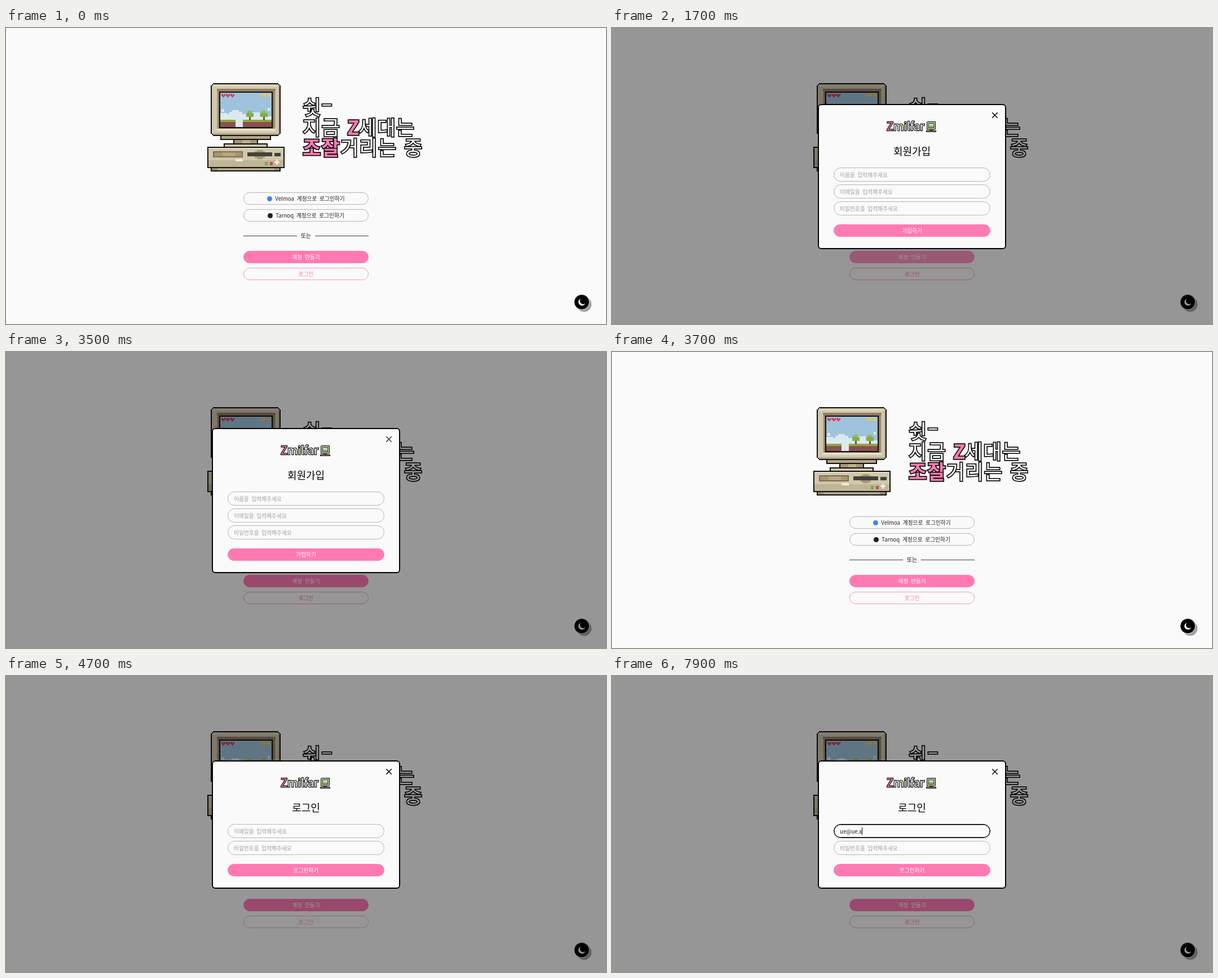
Write an HTML page that moves like this. It is 1064 px wide and 526 px high and loops after 8 s.

```html
<!DOCTYPE html>
<html lang="ko">
<head>
<meta charset="utf-8">
<title>로그인</title>
<style>
  :root { --pink: #ff7ab2; --paper: #fafafa; }
  * { box-sizing: border-box; }
  html, body { margin: 0; width: 100%; height: 100%; overflow: hidden; background: var(--paper); }
  body {
    position: relative;
    font: 300 9.7px "Noto Sans CJK KR", "Noto Sans CJK", "Noto Sans CJK JP", "Noto Sans", sans-serif;
    word-spacing: 2px;
    color: #222;
  }
  .art { position: absolute; left: 0; top: 0; }
  .art rect { shape-rendering: crispEdges; }
  .outlined { fill: #fff; stroke: #0c0c0c; paint-order: stroke; stroke-linejoin: miter; stroke-miterlimit: 2; }
  .outlined .hot { fill: var(--pink); }
  .headline { font-size: 35px; letter-spacing: 1.2px; stroke-width: 3.4px; }
  .headline .hot { font-weight: 700; }
  .pill {
    position: absolute; display: flex; align-items: center; justify-content: center; gap: 5px;
    height: 22px; border-radius: 13px; border: 1px solid #b4b4b4; white-space: pre;
  }
  .main { left: 421px; width: 222px; }
  .solid { background: var(--pink); border-color: var(--pink); color: #fff; font-weight: 400; }
  .line { color: var(--pink); border-color: #f59abf; }
  .hover { opacity: .8; }
  .dot { width: 9px; height: 9px; border-radius: 50%; }
  .or { position: absolute; left: 421px; top: 359px; width: 222px; line-height: 20px; text-align: center; color: #000; }
  .or::before, .or::after { content: ""; position: absolute; top: 10px; width: 95px; height: 1px; background: #3c3f3c; }
  .or::before { left: 0; }
  .or::after { right: 0; }
  .shade { position: absolute; inset: 0; background: rgba(0, 0, 0, .4); }
  .modal {
    position: absolute; left: 365px; width: 334px; border-radius: 6px;
    background: var(--paper); box-shadow: inset 0 0 0 2px #000;
  }
  .modal > * { position: absolute; }
  .modal .pill { left: 28px; width: 278px; }
  .close { left: 309px; top: 15px; }
  .logo { left: 115px; top: 28px; }
  .logo text { font-size: 20px; stroke-width: 2.4px; }
  .title { top: 73px; width: 100%; font-size: 18px; line-height: 20px; text-align: center; color: #000; }
  .modal .field { height: 25px; justify-content: flex-start; padding-left: 10px; gap: 0; color: #222; }
  .hint { color: #a2a2a2; }
  .caret { position: absolute; width: 1px; height: 13px; top: 5px; background: #000; }
  .focus { border-color: #000; box-shadow: inset 0 0 0 .7px #000; }
  [hidden] { display: none !important; }
</style>
</head>
<body>
<svg class="art" width="1064" height="526" viewBox="0 0 1064 526">
  <!-- stand -->
  <rect x="380" y="190" width="90" height="9" fill="#111"/>
  <rect x="382" y="192" width="86" height="5" fill="#b3a586"/>
  <rect x="403" y="197" width="44" height="10" fill="#111"/>
  <rect x="405" y="199" width="40" height="6" fill="#a59677"/>
  <rect x="419" y="199" width="14" height="6" fill="#bdb092"/>
  <rect x="386" y="205" width="78" height="8" fill="#111"/>
  <rect x="388" y="207" width="74" height="4" fill="#cfc6aa"/>
  <!-- monitor -->
  <rect x="367" y="98" width="116" height="94" fill="#111"/>
  <rect x="365" y="100" width="120" height="90" fill="#111"/>
  <rect x="363" y="102" width="124" height="86" fill="#111"/>
  <rect x="367" y="100" width="116" height="90" fill="#d0c8ae"/>
  <rect x="365" y="102" width="120" height="86" fill="#d0c8ae"/>
  <rect x="367" y="102" width="114" height="2" fill="#e2dbc5"/>
  <rect x="367" y="187" width="116" height="3" fill="#b0a483"/>
  <rect x="483" y="104" width="2" height="83" fill="#b0a483"/>
  <rect x="374" y="108" width="104" height="74" fill="#8f7d63"/>
  <rect x="374" y="112" width="2" height="70" fill="#b3a586"/>
  <rect x="476" y="112" width="2" height="70" fill="#b3a586"/>
  <rect x="374" y="179" width="104" height="4" fill="#e6dfcc"/>
  <rect x="378" y="113" width="95" height="65" fill="#111"/>
  <!-- game scene -->
  <rect x="380" y="115" width="91" height="61" fill="#9fc3dc"/>
  <g fill="#dde9f0">
    <rect x="382" y="144" width="5" height="5"/>
    <rect x="380" y="151" width="12" height="12"/>
    <rect x="392" y="153" width="35" height="10"/>
    <rect x="396" y="149" width="23" height="6"/>
    <rect x="401" y="146" width="12" height="4"/>
    <rect x="434" y="150" width="16" height="13"/>
    <rect x="425" y="157" width="46" height="6"/>
    <rect x="464" y="142" width="4" height="5"/>
  </g>
  <rect x="380" y="163" width="91" height="4" fill="#8fa842"/>
  <rect x="380" y="167" width="91" height="9" fill="#8b524d"/>
  <rect x="407" y="161" width="13" height="15" fill="#dde9f0"/>
  <g id="tree">
    <rect x="431" y="157" width="3" height="7" fill="#76513d"/>
    <rect x="426" y="151" width="13" height="7" fill="#80b047"/>
    <rect x="428" y="147" width="8" height="4" fill="#8fbe52"/>
  </g>
  <use href="#tree" x="25"/>
  <path id="heart" fill="#d63c4d" d="M382 117h3v2h2v-2h2v4h-2v2h-3v-2h-2z"/>
  <use href="#heart" x="8"/>
  <use href="#heart" x="16"/>
  <rect id="coin" x="451" y="117" width="5" height="5" fill="#efc35e"/>
  <use href="#coin" x="6"/>
  <use href="#coin" x="13"/>
  <!-- case -->
  <rect x="363" y="246" width="124" height="9" fill="#111"/>
  <rect x="365" y="248" width="120" height="5" fill="#9c8b6c"/>
  <rect x="375" y="248" width="100" height="5" fill="#b3a586"/>
  <rect x="357" y="211" width="137" height="38" fill="#111"/>
  <rect x="359" y="213" width="133" height="34" fill="#d0c8ae"/>
  <rect x="359" y="213" width="133" height="2" fill="#e2dbc5"/>
  <rect x="359" y="235" width="133" height="12" fill="#bfb597"/>
  <rect x="367" y="219" width="53" height="11" fill="#7f6d52"/>
  <rect x="369" y="221" width="49" height="7" fill="#a8956f"/>
  <rect x="384" y="221" width="22" height="7" fill="#b7a682"/>
  <rect x="441" y="219" width="18" height="12" fill="#a39775"/>
  <rect x="445" y="217" width="10" height="16" fill="#a39775"/>
  <rect x="428" y="221" width="44" height="7" fill="#45403a"/>
  <rect x="476" y="222" width="11" height="6" fill="#45403a"/>
  <rect x="407" y="233" width="13" height="4" fill="#f0ebdc"/>
  <rect x="459" y="238" width="5" height="6" fill="#7ea64b"/>
  <rect x="468" y="238" width="5" height="6" fill="#c54c57"/>
  <path fill="#f0ebdc" d="M479 234h3v3h3v3h-3v3h-3v-3h-3v-3h3z"/>

  <g class="outlined headline">
    <text x="526" y="154">쉿<tspan dy="-4">–</tspan></text>
    <text x="526" y="190">지금<tspan class="hot" x="605">Z</tspan><tspan x="625">세대는</tspan></text>
    <text x="526" y="226"><tspan class="hot">조잘</tspan><tspan x="593">거리는</tspan><tspan x="706">중</tspan></text>
  </g>

  <circle cx="1025" cy="491" r="13.3" fill="#a0a0a0"/>
  <circle cx="1021" cy="487" r="13.5" fill="#000" stroke="#fafafa"/>
  <path fill="#fff" d="M1019.5 481a6.3 6.3 0 1 0 7.8 8.2a5.6 5.6 0 0 1-7.8-8.2z"/>
</svg>

<div class="pill main" style="top:292px"><i class="dot" style="background:#4285f4"></i>Velmoa 계정으로 로그인하기</div>
<div class="pill main" style="top:322px"><i class="dot" style="background:#1b1f23"></i>Tarnoq 계정으로 로그인하기</div>
<div class="or">또는</div>
<div class="pill main solid" id="join" style="top:396px">계정 만들기</div>
<div class="pill main line" id="enter" style="top:426px">로그인</div>
<div class="shade" id="shade" hidden></div>

<script>
  const LOOP = 8000;
  const EMAIL = "ue@ue.x";
  const KEYS = [6600, 6700, 7100, 7400, 7600, 7800, 7900];
  const get = id => document.getElementById(id);

  const logo = `
    <svg class="logo" width="110" height="26">
      <text class="outlined" x="7" y="19"><tspan class="hot">Z</tspan>m<tspan fill="#ffe79a">i</tspan>lfar</text>
      <g shape-rendering="crispEdges">
        <rect x="78" y="3" width="16" height="15" rx="2" fill="#111"/>
        <rect x="79" y="4" width="14" height="13" fill="#b9b48c"/>
        <rect x="81" y="6" width="10" height="9" fill="#3d4a3c"/>
        <rect x="82" y="7" width="8" height="4" fill="#b5d8dc"/>
        <rect x="82" y="11" width="8" height="3" fill="#8fae4e"/>
        <rect x="83" y="18" width="6" height="1" fill="#6b6048"/>
        <rect x="77" y="19" width="18" height="3" fill="#111"/>
        <rect x="78" y="20" width="16" height="1" fill="#a59677"/>
      </g>
    </svg>`;

  function addModal(id, top, title, fields, action) {
    const n = fields.length;
    const inputs = fields.map((name, i) =>
      `<div class="pill field" style="top:${113 + 30 * i}px"><span class="hint">${name} 입력해주세요</span></div>`);
    get("shade").insertAdjacentHTML("beforeend", `
      <div class="modal" id="${id}" style="top:${top}px;height:${168 + 30 * n}px">
        <svg class="close" width="10" height="10"><path d="M0 0L10 10M10 0L0 10" stroke="#000" stroke-width="1.5"/></svg>
        ${logo}
        <div class="title">${title}</div>
        ${inputs.join("")}
        <div class="pill solid" style="top:${124 + 30 * n}px">${action}</div>
      </div>`);
    return get(id);
  }

  const signup = addModal("signup", 135, "회원가입", ["이름을", "이메일을", "비밀번호를"], "가입하기");
  const login = addModal("login", 150, "로그인", ["이메일을", "비밀번호를"], "로그인하기");
  const field = login.querySelector(".field");
  const hint = field.querySelector(".hint");
  const typed = document.createElement("span");
  const caret = document.createElement("i");
  caret.className = "caret";
  field.append(typed, caret);

  function draw(t) {
    const during = (from, to) => t >= from && t < to;
    const joining = during(1700, 3700);
    const entering = t >= 4700;

    get("join").classList.toggle("hover", during(700, 1800));
    get("enter").classList.toggle("hover", during(4400, 4900));
    get("shade").hidden = !joining && !entering;
    signup.hidden = !joining;
    login.hidden = !entering;
    signup.querySelector(".close").classList.toggle("hover", t >= 3500);

    const count = KEYS.filter(k => t >= k).length;
    field.classList.toggle("focus", t >= 5600);
    hint.hidden = count > 0;
    typed.textContent = EMAIL.slice(0, count);
    caret.hidden = !(during(5600, 6100) || t >= 6600);
    caret.style.left = 10 + typed.offsetWidth + "px";
  }

  const start = performance.now();
  function tick() {
    draw((performance.now() - start) % LOOP);
    requestAnimationFrame(tick);
  }
  tick();
</script>
</body>
</html>
```
